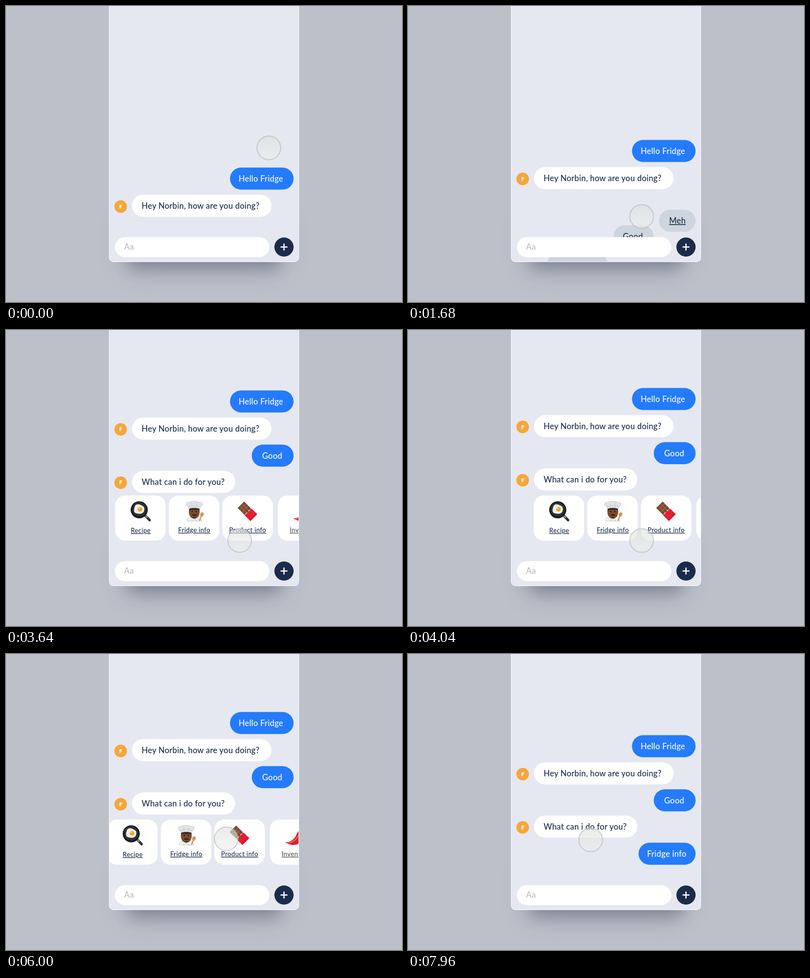
Recreate the animation shown at these times as an HTML page. Size 800x600 px, loop 8000 ms.

```html
<!DOCTYPE html>
<html lang="en">
<head>
<meta charset="utf-8">
<title>Fridge chat</title>
<style>
  html, body { margin: 0; width: 100%; height: 100%; overflow: hidden; background: #bbc0c9; }
  svg { display: block; width: 800px; height: 600px; }
  text { font: 500 16.4px Lato, "Open Sans", sans-serif; letter-spacing: .24px; fill: #1b2b4a; }
  .blue rect { fill: #247bfb; }
  .blue text { fill: #fff; }
  .white rect, .card rect { fill: #fff; }
  .option rect { fill: #ced5dc; }
  .option text, .card text { text-decoration: underline; text-underline-offset: 2px; }
  .card text { font-size: 13px; letter-spacing: .36px; text-anchor: middle; }
  .white .avatar { font-size: 11px; font-weight: 900; fill: #fff; letter-spacing: 0; text-anchor: middle; }
</style>
</head>
<body>
<svg id="stage" viewBox="0 0 800 600"></svg>
<script>
const LOOP = 8000;
const stage = document.getElementById('stage');

const avatar = `<circle cx="231.7" cy="24" r="12.7" fill="#f6a63b"/>
  <text class="avatar" x="231.9" y="28">F</text>`;

const bubble = (id, kind, x, w, tx, label) =>
  `<g id="${id}" class="${kind}"><rect x="${x}" width="${w}" height="44.7" rx="22.35"/>
   <text x="${tx}" y="28.4">${label}</text>${kind === 'white' ? avatar : ''}</g>`;

const card = (x, label, tx, ty, icon, fill = '#1b2b4a') =>
  `<g class="card" transform="translate(${x} 335.5)"><rect width="102" height="91.5" rx="20"/>
   ${icon}<text x="${tx}" y="${ty}" style="fill:${fill}">${label}</text></g>`;

const pan = `
  <path d="M61 41L69.5 50" stroke="#2b3034" stroke-width="5" stroke-linecap="round"/>
  <path d="M60 40L65 45" stroke="#8d9499" stroke-width="3"/>
  <circle cx="48.5" cy="29" r="17.3" fill="#15191b"/>
  <circle cx="48.5" cy="28" r="14.5" fill="#2b3235"/>
  <path d="M40 21C44 15 52 19 55 21C60 23 59 29 58 32C55 39 47 37 42 36C36 34 38 27 40 21Z" fill="#f2efe8"/>
  <circle cx="50" cy="28" r="4.6" fill="#f5a11c"/>
  <circle cx="48.8" cy="26.6" r="1.7" fill="#ffd571"/>`;

const chef = `
  <path d="M37 52C37 44 42 42 52 41C61 42 66 45 66 52Z" fill="#eceef0" stroke="#c9cdd1" stroke-width=".8"/>
  <path d="M45 43L52 50L58 43" fill="#d5d9dc"/>
  <ellipse cx="51.5" cy="34" rx="10.8" ry="13" fill="#7d4b2c"/>
  <path d="M41 26H62V34L60 29H43L41 34Z" fill="#30231c"/>
  <path d="M46 39.5C48 37 55 37 57 39.5L55 41H48Z" fill="#342319"/>
  <path d="M49 44.5H54" stroke="#3b281e" stroke-width="2"/>
  <circle cx="47.5" cy="32.5" r="1.4" fill="#271c17"/><circle cx="55.5" cy="32.5" r="1.4" fill="#271c17"/>
  <path d="M40.5 27L39 22C33 20 34 13 41 14C46 11 57 11 62 14C69 13 70 20 64 22L62.5 27C56 24 47 24 40.5 27Z" fill="#e2e5e7" stroke="#b9bec2" stroke-width=".8"/>
  <path d="M46 16L47 23M57 16L56 23M39.5 22.5C47 20 56 20 63.5 22.5" fill="none" stroke="#bcc1c5" stroke-width=".9"/>
  <path d="M66 41L62 51" stroke="#c58148" stroke-width="2"/>
  <ellipse cx="67" cy="38.5" rx="3.6" ry="4.7" transform="rotate(22 67 38.5)" fill="#d69458"/>
  <path d="M47 49V52M56 49V52" stroke="#a9b0b6"/>`;

const chocolate = `
  <g transform="translate(50.5 31.8) rotate(45)">
    <path d="M-18.5 -9.3H2V9.3H-18.5Z" fill="#79472f"/>
    <path d="M-12.5 -9V9M-6.5 -9V9M-18 -3H0M-18 3H0" stroke="#a9745a"/>
    <path d="M-1 -9.6L2 -7L0 -3L3 0L0 4L2 9.6H6V-9.6Z" fill="#dadde1"/>
    <path d="M2 -9.8H18.5V9.8H2Z" fill="#e5202f"/>
    <path d="M16 -9.8V9.8" stroke="#b91623"/>
  </g>`;

const chili = `
  <path d="M31 46C41 47 50 40 54 30C57 23 62 20 67 22C73 24 73 32 70 38C63 52 44 56 31 46Z" fill="#d9232e"/>
  <path d="M36 47.5C49 47 55 38 59 30" fill="none" stroke="#f3666a" stroke-width="2" stroke-linecap="round"/>
  <path d="M57 25C59 19 66 18 71 25C66 22 62 24 57 25Z" fill="#63952e"/>
  <path d="M66 21C70 19 70 16 67 13" fill="none" stroke="#63952e" stroke-width="2.5" stroke-linecap="round"/>`;

stage.innerHTML = `
  <defs>
    <clipPath id="inside"><path d="M209 0H591V509Q591 518 582 518H218Q209 518 209 509Z"/></clipPath>
    <filter id="soft" x="-30%" y="-80%" width="160%" height="260%"><feGaussianBlur stdDeviation="16"/></filter>
    <filter id="wide" x="-30%" y="-80%" width="160%" height="260%"><feGaussianBlur stdDeviation="24"/></filter>
    <linearGradient id="glass" x2="0" y2="1">
      <stop stop-color="#dbe0df"/><stop offset="1" stop-color="#efeeee"/>
    </linearGradient>
  </defs>
  <rect width="800" height="600" fill="#bbc0c9"/>
  <rect x="235" y="430" width="330" height="108" rx="30" fill="#6b7385" opacity=".33" filter="url(#wide)"/>
  <rect x="245" y="440" width="310" height="90" rx="20" fill="#484f5e" opacity=".42" filter="url(#soft)"/>
  <path d="M208.5 -2H591.5V509Q591.5 518.5 582 518.5H218Q208.5 518.5 208.5 509Z" fill="#e5e8f0" stroke="#fafbfd"/>
  <g clip-path="url(#inside)">
    ${bubble('hello', 'blue', 452.5, 128.5, 470, 'Hello Fridge')}
    ${bubble('hey', 'white', 254.5, 282, 274, 'Hey Norbin, how are you doing?')}
    ${bubble('good', 'blue', 496.5, 84.5, 517.5, 'Good')}
    ${bubble('what', 'white', 254.5, 208.5, 274, 'What can i do for you?')}
    ${bubble('info', 'blue', 465.7, 115.3, 483, 'Fridge info')}
    ${bubble('opt0', 'option', 281, 123, 301.5, 'Wonderful')}
    ${bubble('opt1', 'option', 415, 81.5, 434, 'Good')}
    ${bubble('opt2', 'option', 507, 74, 527.5, 'Meh')}
    <g id="cards">
      ${card(254.5, 'Recipe', 51.5, 75.5, pan)}
      ${card(362.7, 'Fridge info', 51.5, 74.5, chef)}
      ${card(471, 'Product info', 51, 74.5, chocolate)}
      ${card(583, 'Inventory', 53, 74.5, chili, '#505358')}
    </g>
    <rect x="220" y="468.5" width="312" height="40.5" rx="20.25" fill="#fff"/>
    <text x="238.5" y="494.3" style="fill:#b8bcc4">Aa</text>
    <circle cx="561.6" cy="488.6" r="19.4" fill="#1b2b4a"/>
    <path d="M554.6 488.6H568.6M561.6 481.6V495.6" stroke="#fff" stroke-width="2.5"/>
  </g>
  <g id="cursor">
    <circle r="24" fill="url(#glass)" fill-opacity=".6" stroke="#a9acae" stroke-opacity=".48" stroke-width="2.2"/>
  </g>`;

const parts = {};
stage.querySelectorAll('g[id]').forEach(g => parts[g.id] = g);
const place = (id, x, y, s = 1) =>
  parts[id].setAttribute('transform', `translate(${x} ${y}) scale(${s})`);

const clamp = p => Math.min(1, Math.max(0, p));
// Progress of a smooth move that begins at a and lasts d ms
const move = (t, a, d = 300) => {
  const p = clamp((t - a) / d);
  return p < .5 ? 4 * p ** 3 : 1 - 4 * (1 - p) ** 3;
};
const fall = (t, a, d = 275) => clamp((t - a) / d) ** 2;
const spring = (t, a) => {
  const s = Math.max(0, t - a) / 1000;
  return 1 - Math.exp(-10 * s) * (Math.cos(16.76 * s) + .6 * Math.sin(16.76 * s));
};

function render(t) {
  const top = 327.5 - 56 * move(t, 240) - 52 * move(t, 3094)
    - 102 * move(t, 3410) + 47 * move(t, 7150);
  place('hello', 0, top);
  place('hey', 0, top + 55);
  place('good', 100 * (1 - move(t, 1820)), top + 109.8);
  place('what', 0, top + 163 + 90 * (1 - move(t, 3078)));
  place('info', 135 * (1 - move(t, 7200)), top + 218);

  [1432, 1532, 1660].forEach((out, i) =>
    place('opt' + i, 0, 412.3 + 110 * (1 - move(t, 300 + 80 * i) + fall(t, out))));

  const scroll = -119 * move(t, 4720, 450) + 69 * move(t, 5400, 420);
  place('cards', 345 * (1 - spring(t, 3400)) + scroll + 410 * move(t, 7080), 0);

  const toOption = move(t, 960, 380), toCards = move(t, 4320, 340), toInfo = move(t, 6020, 380);
  const press = a => move(t, a, 100) - move(t, a + 120, 100);
  const drag = move(t, 4640, 80) - move(t, 5840, 80);
  place('cursor',
    531 - 59 * toOption + 23 * toCards + scroll - 76 * toInfo,
    287.6 + 139 * toOption - 52 * toCards + 2 * toInfo,
    1 - .04 * (drag + press(1400) + press(6990)));
}

const start = performance.now();
function tick(now) {
  render(Math.max(0, now - start) % LOOP);
  requestAnimationFrame(tick);
}
render(0);
requestAnimationFrame(tick);
</script>
</body>
</html>
```
